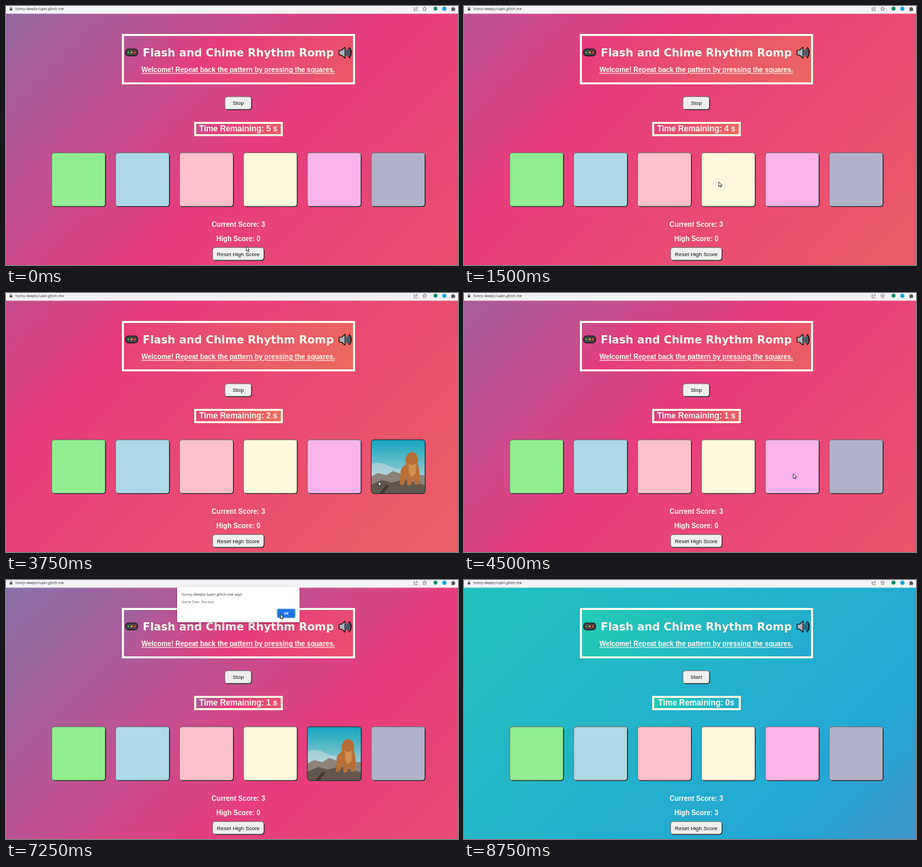
Recreate the animation shown at these times as an HTML page. Size 663 by 380 pixels, loop 9000 ms.

```html
<!DOCTYPE html>
<html lang="en">
<head>
<meta charset="utf-8">
<title>Memory game</title>
<style>
html, body { margin: 0; width: 100%; height: 100%; overflow: hidden; }
.grad, svg { position: absolute; box-sizing: border-box; }
.grad {
  background: linear-gradient(-45deg, #ee7752, #e73c7e, #23a6d5, #23d5ab);
  background-size: 400% 400%;
}
#page { left: 0; top: 11px; width: 663px; height: 369px; }
#head { left: 170px; top: 41px; width: 341.5px; height: 74px; border: 3px solid #fffaf0; }
#time { left: 276px; top: 170px; width: 129.5px; height: 20.5px; border: 3px solid #fff8e4; }
svg { left: 0; top: 0; }
text { font: bold 10px "Liberation Sans", Arial, sans-serif; fill: #fffaf0; }
.mid { text-anchor: middle; }
.title { font: bold 15.95px "DejaVu Sans", Verdana, sans-serif; filter: drop-shadow(.9px .9px 0 #5558); }
.btn { font-weight: normal; font-size: 8px; fill: #111; }
.ui { font: 5.35px "Open Sans", sans-serif; fill: #333; }
</style>
</head>
<body>
<div class="grad" id="page"></div>
<div class="grad" id="head"></div>
<div class="grad" id="time"></div>
<svg width="663" height="380" viewBox="0 0 663 380">
  <defs>
    <linearGradient id="sky" x2="0" y2="1">
      <stop stop-color="#12a5c0"/><stop offset=".65" stop-color="#8fcad0"/>
    </linearGradient>
    <clipPath id="round"><rect width="79" height="79" rx="4"/></clipPath>
    <filter id="shade" x="-10%" y="-20%" width="120%" height="150%">
      <feDropShadow dx="0" dy="1" stdDeviation="1.5" flood-opacity=".35"/>
    </filter>
  </defs>

  <!-- browser bar -->
  <rect width="663" height="11.3" fill="#f3f3f5"/>
  <rect x="5.5" y="3.4" width="3.6" height="3" rx=".4" fill="#444"/>
  <path d="M6.2 3.5V2.6a1.1 1.1 0 0 1 2.2 0V3.5" fill="none" stroke="#444" stroke-width=".6"/>
  <text class="ui" x="13.7" y="6.2">funny-deeply-lupin.glitch.me</text>
  <g fill="none" stroke="#666" stroke-width=".7">
    <path d="M600 2.5H598.6V6.8H603.2V5.5M600 5Q600.5 3 603.6 2.8M602.3 1.4L603.8 2.8L602.3 4.2"/>
    <path d="M614 1.2L614.9 3.1L617 3.3L615.4 4.7L615.9 6.8L614 5.7L612.1 6.8L612.6 4.7L611 3.3L613.1 3.1Z"/>
  </g>
  <circle cx="630" cy="3.8" r="2.9" fill="#118a62"/>
  <circle cx="643" cy="4" r="3.1" fill="#18a7e0"/>
  <path d="M653.3 2.4H655A1 1 0 0 1 657 2.4H658.4V4A1 1 0 0 1 658.4 5.8V7.2H653.3V5.6A1 1 0 0 0 653.3 4Z" fill="#555"/>

  <!-- heading -->
  <g stroke="#151515">
    <rect x="175.5" y="63.2" width="17.5" height="9.8" rx="4" fill="#4c4a4d" stroke-width="1.3"/>
    <g stroke-width=".6">
      <circle cx="179.6" cy="68.1" r="2" fill="#3fa66a"/>
      <circle cx="184.3" cy="68.1" r="2" fill="#e5a04a"/>
      <circle cx="189" cy="68.1" r="2" fill="#e8484f"/>
    </g>
    <path d="M488.6 65H492L497.3 60.5V76.5L492 72H488.6Z" fill="#a9b4ba" stroke-width="1.2" stroke-linejoin="round"/>
    <g fill="none" stroke-linecap="round">
      <path id="arcs" d="M499.5 65.5Q501.5 68.5 499.5 71.5M501.6 63.3Q505 68.5 501.6 73.7M503.7 61.3Q508.6 68.5 503.7 75.7" stroke-width="1.9"/>
      <use href="#arcs" stroke="none"/>
      <path d="M499.5 65.5Q501.5 68.5 499.5 71.5M501.6 63.3Q505 68.5 501.6 73.7" stroke="#35b5e0" stroke-width=".8"/>
    </g>
  </g>
  <text class="title mid" x="340.7" y="73.6">Flash and Chime Rhythm Romp</text>
  <text class="mid" x="340.6" y="97.4" text-decoration="underline">Welcome! Repeat back the pattern by pressing the squares.</text>
  <text class="mid" id="left" x="340.7" y="184" style="font-size:11.85px"></text>

  <g id="boxes"></g>
  <text class="mid" x="340.8" y="323.6">Current Score: 3</text>
  <text class="mid" id="best" x="340.8" y="345.2"></text>
  <text class="mid btn" id="toggle" x="340.7" y="145.3"></text>
  <text class="mid btn" x="340.7" y="366.5">Reset High Score</text>

  <!-- picture shown on a pressed square -->
  <g id="photo">
    <g clip-path="url(#round)">
      <rect width="79" height="79" fill="url(#sky)"/>
      <path d="M0 36Q12 31 25 38T50 42V60H0Z" fill="#c3dadb" opacity=".6"/>
      <path d="M0 54L10 49L22 52L32 46L44 50L79 52V79H0Z" fill="#8d8279"/>
      <path d="M0 66L16 59L30 63L48 58L79 67V79H0Z" fill="#62574f"/>
      <path d="M12 79L22 66L26 68L18 79Z" fill="#41372f"/>
      <path d="M53 21Q60 15 66 21L69 29L68 35Q73 46 69 66H64L62 56L58 67H53L52 55L47 66H42L43 50Q42 41 51 36L50 29Z" fill="#b86f35"/>
      <path d="M55 35Q60 39 66 35L65 50L59 55L55 47Z" fill="#d3914f"/>
    </g>
    <rect width="79" height="79" rx="4" fill="none" stroke="#333"/>
  </g>

  <g id="alert">
    <rect x="251" y="10" width="179.5" height="52" rx="2" fill="#fff" filter="url(#shade)"/>
    <text class="ui" x="257.8" y="23.3" style="font-size:5.7px">funny-deeply-lupin.glitch.me says</text>
    <text class="ui" x="257.8" y="34.4" style="font-size:4.9px;fill:#555">Game Over. You lost.</text>
    <rect x="397.8" y="42.3" width="26.4" height="13.4" rx="2" fill="#1a73e8" stroke="#8db9f3"/>
    <text class="ui mid" x="411" y="50.8" style="font-size:4.6px;font-weight:bold;fill:#fff">OK</text>
  </g>
  <path id="cursor" d="M0 0V7L1.6 5.6L2.7 8L3.8 7.5L2.7 5.2H4.9Z" fill="#fff" stroke="#222" stroke-width=".8"/>
</svg>
<script>
const $ = id => document.getElementById(id);
const boxX = i => 67 + 93.75 * i;

function button(x, y, w, h, fill) {
  return `<g transform="translate(${x} ${y})">
    <rect width="${w}" height="${h}" rx="4" fill="${fill}" stroke="#666" stroke-width=".9"/>
    <path d="M${w} 3V${h - 4}Q${w} ${h} ${w - 4} ${h}H3" fill="none" stroke="#222" stroke-width="1.1"/></g>`;
}
const colors = ['#90ee90', '#add8e6', '#fbc0cb', '#fff8df', '#f9b3e9', '#b2b1ca'];
$('boxes').innerHTML = colors.map((c, i) => button(boxX(i), 215.3, 79, 79, c)).join('') +
  button(321, 133, 39.3, 19, '#efefef') + button(303, 354.3, 75.5, 19, '#efefef');

// CSS "ease" curve, solved by bisection
function ease(x) {
  let lo = 0, hi = 1, u;
  for (let i = 0; i < 24; i++) {
    u = (lo + hi) / 2;
    if (.75 * u * (1 - u) + u ** 3 < x) lo = u; else hi = u;
  }
  return .3 * u * (1 - u) ** 2 + 3 * u * u * (1 - u) + u ** 3;
}

// The gradient slides right until 3.6 s, then back
function slide(t) {
  return t < 3.6 ? ease((t + 3.9) / 7.5) : 1 - ease((t - 3.6) / 7.5);
}

const path = [[0, 352.3, 352.5], [1.25, 373.7, 258], [2.5, 373.7, 258], [3.5, 546.3, 276],
  [4, 546.3, 276], [4.5, 483, 265], [5.75, 483, 265], [7, 402.5, 50], [7.5, 402.5, 50],
  [8.25, 640, -20], [9, 640, -20]];

function pointer(t) {
  const i = path.findIndex(p => p[0] > t);
  const [t0, x0, y0] = path[i - 1], [t1, x1, y1] = path[i];
  const k = (t - t0) / (t1 - t0), s = k * k * (3 - 2 * k);
  return [x0 + (x1 - x0) * s, y0 + (y1 - y0) * s];
}

const show = (id, on) => $(id).style.display = on ? '' : 'none';

function draw(t) {
  const over = t >= 7.5;
  const pos = 100 * slide(over ? t + 2.1 : Math.min(t, 4.9)) + '% 50%';
  for (const id of ['page', 'head', 'time']) $(id).style.backgroundPosition = pos;

  $('left').textContent = 'Time Remaining: ' + (over ? '0s' : Math.max(1, 5 - Math.floor(t)) + ' s');
  $('best').textContent = 'High Score: ' + (over ? 3 : 0);
  $('toggle').textContent = over ? 'Start' : 'Stop';

  const sixth = t >= 3.5 && t < 4;
  show('photo', sixth || t >= 5 && !over);
  $('photo').setAttribute('transform', `translate(${boxX(sixth ? 5 : 4)} 215.3)`);
  show('alert', t >= 5.25 && !over);
  $('cursor').setAttribute('transform', `translate(${pointer(t)})`);
}

// The picture advances four times a second
const start = performance.now();
function tick() {
  const ms = (performance.now() - start) % 9000;
  draw(Math.floor(ms / 250) / 4);
  requestAnimationFrame(tick);
}
tick();
</script>
</body>
</html>
```
